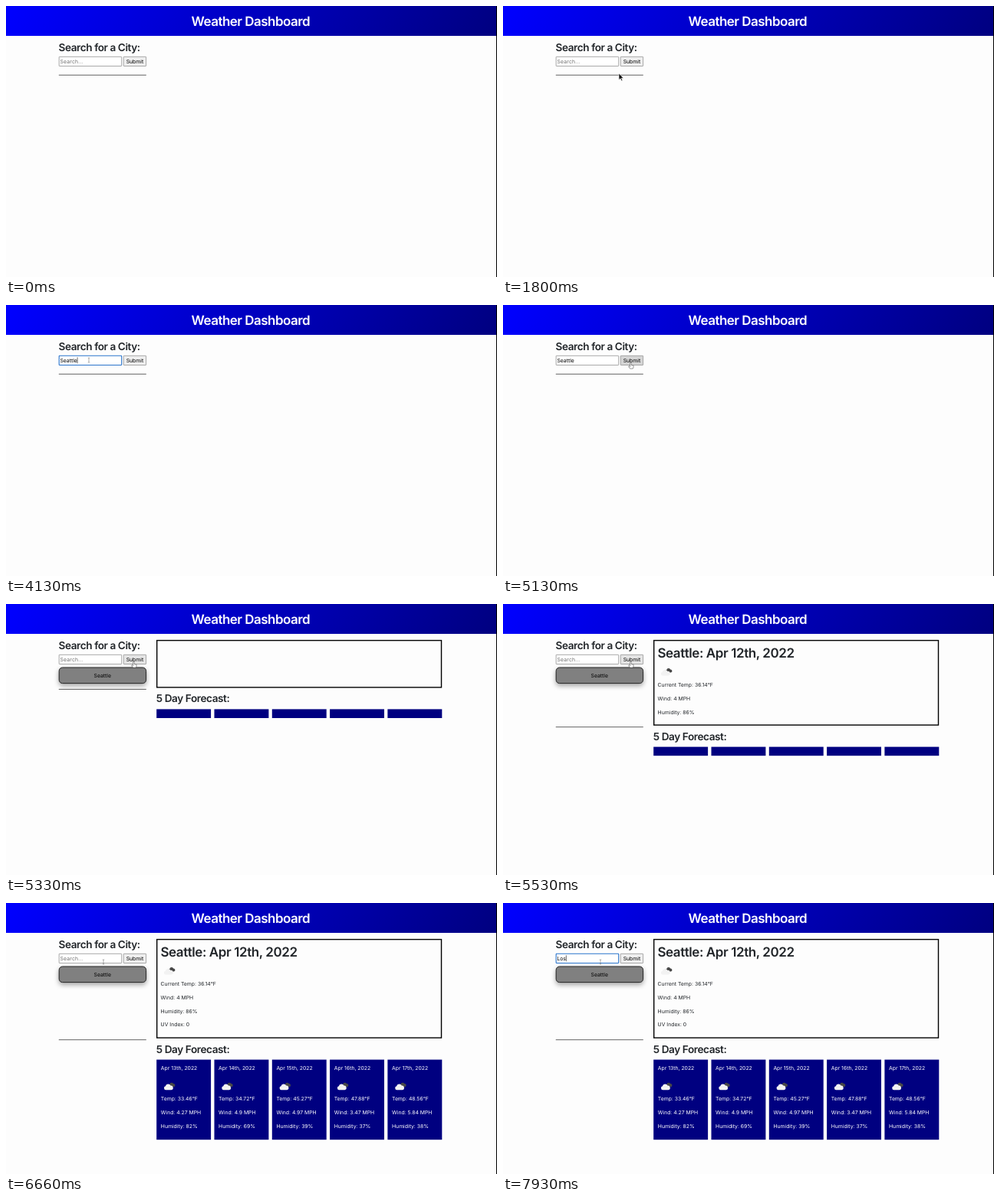
These frames come from a looping animation (640 px wide and 354 px high, 8000 ms). An HTML page:

```html
<!DOCTYPE html>
<html lang="en">
<head>
<meta charset="utf-8">
<title>Weather Dashboard</title>
<style>
html, body { margin: 0; width: 100%; height: 100%; overflow: hidden; background: #fdfdfd; }
header { position: absolute; left: 0; top: 0; width: 640px; height: 39.3px;
  background: linear-gradient(120deg, #00f, #000080); }
svg { position: absolute; left: 0; top: 0; display: block; }
text { font: 6.85px Inter, "Open Sans", sans-serif; text-rendering: geometricPrecision; white-space: pre; }
.h1 { font-size: 17px; font-weight: 600; letter-spacing: -.54px; }
.date { letter-spacing: -.41px; }
.h2 { font-size: 13.6px; font-weight: 600; letter-spacing: -.43px; }
.hint { letter-spacing: .2px; }
.mid { text-anchor: middle; }
.city { filter: drop-shadow(0 3px 3px rgba(0, 0, 0, .35)); }
</style>
</head>
<body>
<header></header>
<svg id="stage" width="640" height="354" viewBox="0 0 640 354"></svg>
<script>
const LOOP = 8000;
const stage = document.getElementById('stage');
const pen = document.createElement('canvas').getContext('2d');

const days = [
  ['13th', 33.46, 4.27, 82], ['14th', 34.72, 4.9, 69], ['15th', 45.27, 4.97, 39],
  ['16th', 47.88, 3.47, 37], ['17th', 48.56, 5.84, 38]
];

// Each entry: start time, value
const typing = [
  [0, ''], [2860, 'S'], [3060, 'Se'], [3200, 'Sea'], [3660, 'Seat'], [3800, 'Seatt'],
  [4000, 'Seattl'], [4130, 'Seattle'], [5330, ''], [7660, 'L'], [7860, 'Lo'], [7930, 'Los']
];
const pointer = [
  [0, null], [800, ['arrow', 174, 97]], [1800, ['arrow', 151, 88]], [1860, ['beam', 120, 76]],
  [1930, ['beam', 108, 72]], [4530, ['beam', 122, 73]], [4660, ['arrow', 150, 71]],
  [4860, ['hand', 166.5, 75.5]], [6400, ['hand', 158, 75.5]], [6460, ['beam', 146, 76]],
  [6600, ['beam', 134, 77]], [6660, ['beam', 127, 77]]
];
// Main box bottom and number of its lines: -1 hidden, 0 empty
const panel = [[0, [0, -1]], [5330, [109.5, 0]], [5460, [158.7, 3]], [5660, [176.7, 4]]];

const at = (track, t) => track.reduce((v, [start, value]) => t >= start ? value : v, null);

const text = (x, y, s, cls = '', fill = '#000') =>
  `<text x="${x}" y="${y}" class="${cls}" fill="${fill}">${s}</text>`;
const rect = (x, y, w, h, fill, more = '') =>
  `<rect x="${x}" y="${y}" width="${w}" height="${h}" fill="${fill}" ${more}/>`;
const outline = (color, width, r = 0) => `stroke="${color}" stroke-width="${width}" rx="${r}"`;

const cloud = (x, y, k, fill) =>
  `<path transform="translate(${x} ${y}) scale(${k})" fill="${fill}"
    d="M2.6 8A2.5 2.5 0 0 1 2.5 3.1A3.6 3.6 0 0 1 9.2 2.3A2.9 2.9 0 0 1 10.2 8Z"/>`;
const icon = y => cloud(211.5, y, .72, '#484848') + cloud(205.4, y + 1.8, 1, '#f2f2f2');

const cursors = {
  arrow: '<path d="M0 0V8.5L2 6.7L3.4 9.8L4.8 9.2L3.4 6.2H6Z" fill="#111" stroke="#fff" stroke-width=".6"/>',
  beam: '<path d="M-1.2 -3.2Q0 -3.2 0 -2.4V2.4Q0 3.2 -1.2 3.2M1.2 -3.2Q0 -3.2 0 -2.4M0 2.4Q0 3.2 1.2 3.2" fill="none" stroke="#777" stroke-width=".6"/>',
  hand: '<path d="M-.8 .4Q0 -.5 .7 .4V3L3.4 3.6Q4 4 3.6 5.6L2.8 7.6H-1L-3 4.6Q-2.6 3.6 -.8 5Z" fill="#fff" stroke="#555" stroke-width=".6"/>'
};

function searchBox(t) {
  const typed = at(typing, t);
  const focus = t >= 2130 && t < 5130 || t >= 6860;
  const hover = t >= 4860 && t < 6400;
  const pressed = t >= 5130 && t < 5260;
  const border = outline('#959595', .8, .4);
  let out = text(68.6, 58.8, 'Search for a City:', 'h2', '#212529');
  out += rect(69.2, 66.3, 81.5, 12.2, '#fff', focus ? outline('#2a74cc', 1.1, .8) : border);
  out += typed ? text(70.4, 74.7, typed) : text(70.4, 74.7, 'Search...', 'hint', '#6c6c6c');
  if (focus && (typed || t >= 2330 && t < 2860 || t >= 7060)) {
    pen.font = '68.5px Inter, "Open Sans", sans-serif';
    out += rect(70.3 + pen.measureText(typed).width / 10, 68.3, .6, 8, '#000');
  }
  const face = pressed ? '#d5d5d5' : hover ? '#e5e5e5' : '#efefef';
  out += rect(153.2, 66.3, 29.4, 12.2, face, border);
  return out + text(167.9, 74.7, 'Submit', 'mid');
}

function today(bottom, lines, t) {
  const facts = ['Current Temp: 36.14°F', 'Wind: 4 MPH', 'Humidity: 86%', 'UV Index: 0'];
  let out = rect(196.7, 47.6, 370.8, bottom - 48.2, 'none', outline('#000', 1.4));
  if (lines) out += text(201.4, 70.2, 'Seattle: Apr 12th, 2022', 'h1 date', '#212529');
  if (lines && t >= 5530) out += icon(83.8);
  facts.slice(0, lines).forEach((s, i) => out += text(201.6, 108 + i * 17.8, s, '', '#212529'));
  return out;
}

function forecast(bottom, full) {
  let out = text(195.8, bottom + 18.8, '5 Day Forecast:', 'h2', '#212529');
  days.forEach(([day, temp, wind, humidity], i) => {
    out += `<g transform="translate(${i * 75.3} 0)">` +
      rect(196.2, bottom + 27.9, 70.9, full ? 104.6 : 11.6, '#000080');
    if (full) {
      out += icon(234.4);
      [[218, `Apr ${day}, 2022`], [258.2, `Temp: ${temp}°F`],
       [276, `Wind: ${wind} MPH`], [293.8, `Humidity: ${humidity}%`]]
        .forEach(([y, s]) => out += text(201.8, y, s, '', '#fff'));
    }
    out += '</g>';
  });
  return out;
}

function scene(t) {
  const [bottom, lines] = at(panel, t);
  const shown = lines >= 0;
  let out = text(241.6, 26, 'Weather Dashboard', 'h1', '#fff') + searchBox(t);
  out += rect(68.8, shown ? bottom + 1.4 : 89.7, 114, 1.1, '#707070');
  if (shown) {
    out += rect(69.2, 83, 113.4, 20.6, '#808080', 'class="city" ' + outline('#222', 1, 4.4));
    out += text(125.7, 95.8, 'Seattle', 'mid');
    out += today(bottom, lines, t) + forecast(bottom, lines === 4);
  }
  out += rect(639, 0, 1, 354, '#000');
  const mouse = at(pointer, t);
  if (mouse) out += `<g transform="translate(${mouse[1]} ${mouse[2]})">${cursors[mouse[0]]}</g>`;
  return out;
}

let last = '';
function frame() {
  const next = scene(performance.now() % LOOP);
  if (next !== last) stage.innerHTML = last = next;
  requestAnimationFrame(frame);
}
frame();
</script>
</body>
</html>
```
